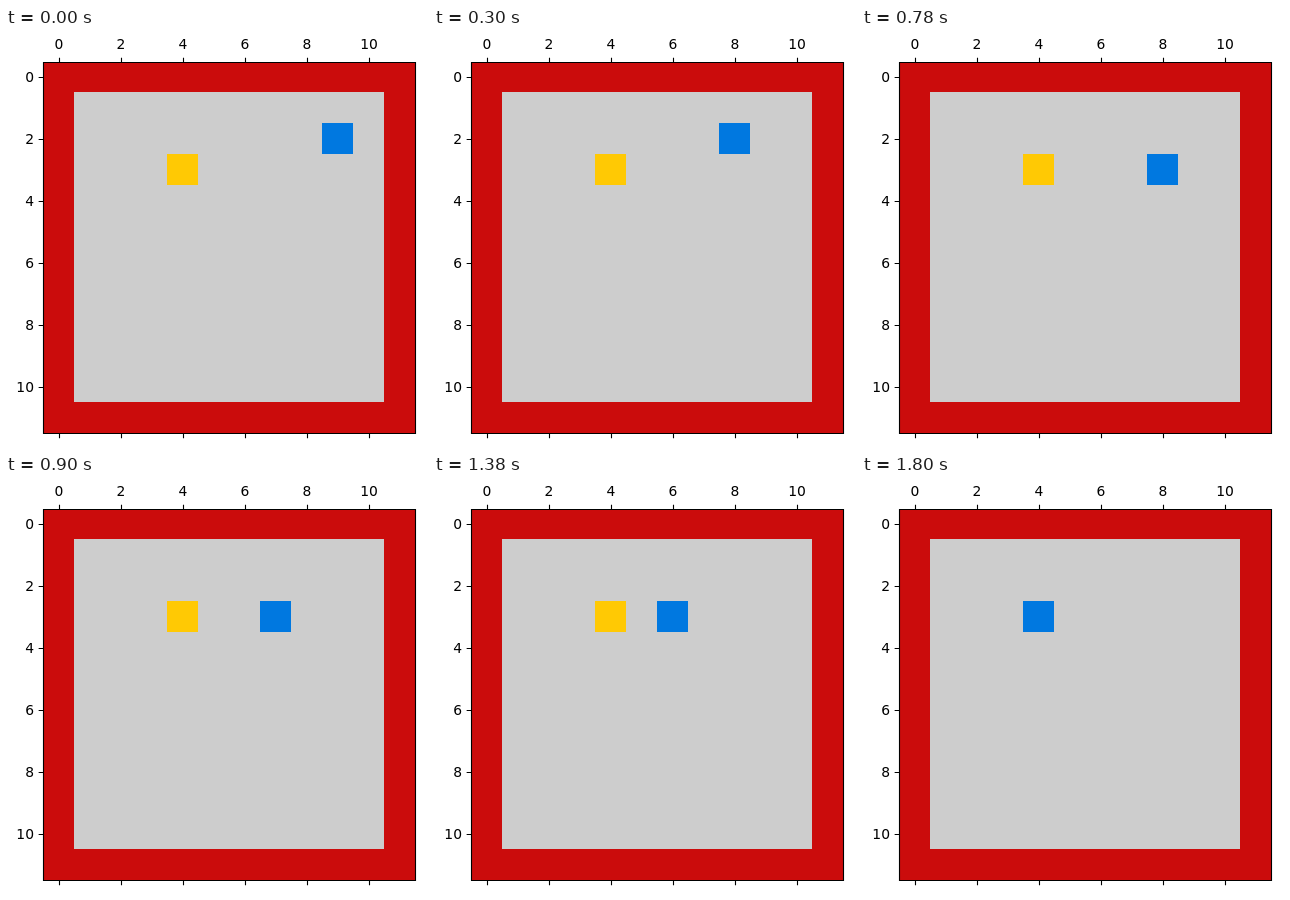
An HTML page for the animation above (2.1 s loop, 422 by 419 pixels).

```html
<!DOCTYPE html>
<html>
<head>
<meta charset="utf-8">
<style>
html, body { margin: 0; width: 100%; height: 100%; overflow: hidden; background: #fff; }
svg { display: block; }
text { font: 13.89px "DejaVu Sans", sans-serif; }
</style>
</head>
<body>
<svg width="422" height="419">
  <g shape-rendering="crispEdges">
    <rect x="37" y="34" width="372" height="372" fill="#cb0c0c"/>
    <rect x="68" y="64" width="310" height="310" fill="#cdcdcd"/>
    <rect x="161" y="126" width="31" height="31" fill="#ffc904"/>
    <rect id="agent" width="31" height="31" fill="#0078e0"/>
  </g>
  <path id="axes" fill="none" stroke="#000" stroke-width="1.11"/>
  <g id="labels"></g>
</svg>
<script>
const CELL = 31, LEFT = 37, TOP = 33, STEP = 300;
const steps = [[9, 2], [8, 2], [8, 3], [7, 3], [6, 3], [5, 3], [4, 3]];
const byId = id => document.getElementById(id);

// Frame, ticks and tick labels
let lines = 'M37.5 34.5H409.5V405.5H37.5Z', labels = '';
for (let n = 0; n <= 10; n += 2) {
  const x = 53.5 + n * CELL, y = 49.5 + n * CELL;
  lines += `M${x} 34.5v-4.86M${x} 405.5v4.86M37.5 ${y}h-4.86`;
  labels += `<text x="${x - 0.5}" y="21" text-anchor="middle">${n}</text>` +
            `<text x="28" y="${y + 4.5}" text-anchor="end">${n}</text>`;
}
byId('axes').setAttribute('d', lines);
byId('labels').innerHTML = labels;

const agent = byId('agent');
function draw() {
  const [col, row] = steps[Math.floor(performance.now() / STEP) % steps.length];
  agent.setAttribute('x', LEFT + col * CELL);
  agent.setAttribute('y', TOP + row * CELL);
  requestAnimationFrame(draw);
}
draw();
</script>
</body>
</html>
```
